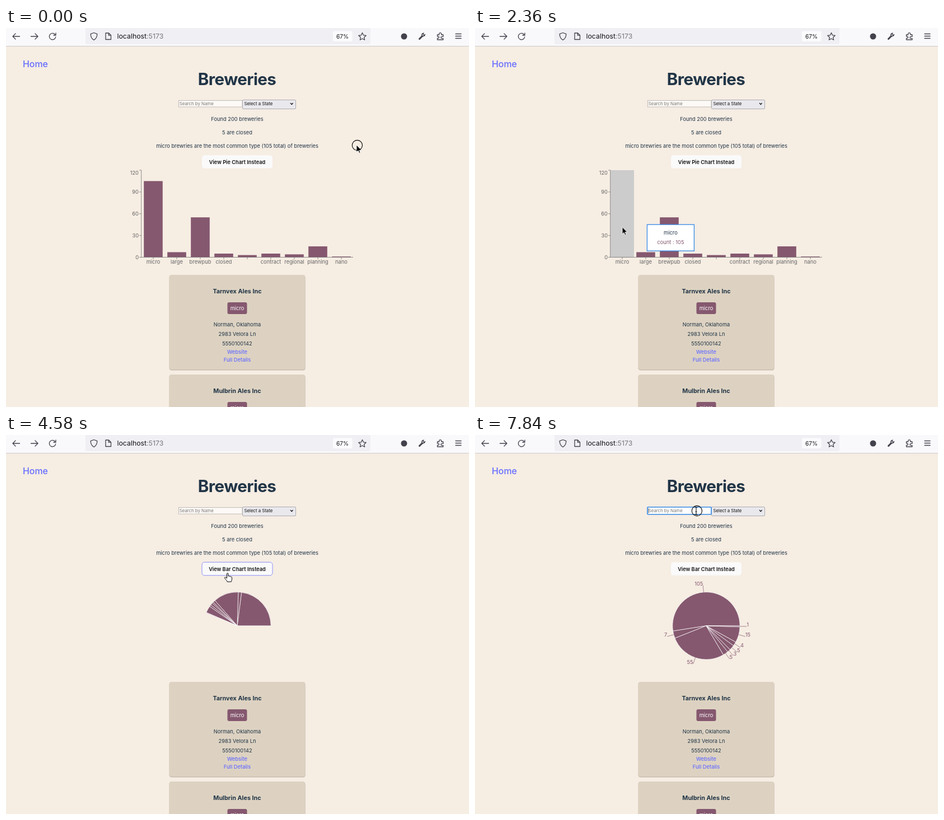
Write an HTML page that moves like this. It is 827x677 px and loops after 7990 ms.

```html
<!DOCTYPE html>
<html lang="en">
<head>
<meta charset="utf-8">
<title>Breweries</title>
<style>
  html, body { margin: 0; width: 100%; height: 100%; overflow: hidden; background: #f6ede3; }
  svg { display: block; width: 827px; height: 677px; font: 9.3px Inter, sans-serif; }
  text { fill: #213547; }
  .mid { text-anchor: middle; }
  .end { text-anchor: end; }
  .h1 { font-size: 29.6px; font-weight: 700; letter-spacing: -.6px; }
  .h3 { font-size: 10.8px; font-weight: 700; }
  .link { fill: #646cff; font-weight: 500; }
  .home { font-size: 15.9px; }
  .btn { font-size: 9.2px; font-weight: 600; fill: #111; }
  .form { font-size: 7.8px; fill: #111; }
  .hint { fill: #7b7977; }
  .white { fill: #fff; }
  .axis { fill: #666; }
  .plum { fill: #85586f; }
  .lines { fill: none; stroke: #777; stroke-width: .8; }
  .icons { fill: none; stroke: #43424c; stroke-width: 1.3; stroke-linecap: round; stroke-linejoin: round; }
</style>
</head>
<body>
<svg viewBox="0 0 827 677">
  <rect width="827" height="677" fill="#f6ede3"/>
  <rect width="827" height="32.5" fill="#f9f9fb"/>
  <path d="M0 32.5H827" stroke="#cfcbca"/>
  <path d="M142 0H651V25a4 4 0 0 1-4 4H146a4 4 0 0 1-4-4Z" fill="#f0f0f4"/>
  <rect x="584" y="5.5" width="34.5" height="18.5" rx="3" fill="#fbfbfd"/>
  <g class="icons">
    <path d="M24.5 15H12M17 10l-5 5 5 5M44.5 15H57M52 10l5 5-5 5"/>
    <path d="M87.5 11.5A5.7 5.7 0 1 0 88.7 16M89 9v4h-4"/>
    <path d="M157 8.5l5.8 2.2c0 5-1.5 8.3-5.8 10.8-4.3-2.5-5.8-5.8-5.8-10.8Z"/>
    <path d="M178 9h5.5l4 4v7.5H178ZM183.3 9v4.2h4"/>
    <path d="M636.5 8.5l2 4.3 4.7.6-3.5 3.2.9 4.7-4.1-2.3-4.1 2.3.9-4.7-3.5-3.2 4.7-.6Z"/>
    <path d="M738.5 19.5l5-5" stroke-width="3"/>
    <path d="M748.5 11.5l-2.2 1.4-1.7-1.6 1.5-2.2a3.6 3.6 0 0 0-3.3 5 3.6 3.6 0 0 0 5.7-2.6Z"/>
    <path d="M770.5 12h3.2c-1-4.5 5-4.5 4 0h3.2v3.3h-2.2c-2.5 0-2.5 3.4 0 3.4h2.2v2.3H770.500v-2.8c4 .7 4-3.8 0-3.2Z"/>
    <path d="M803 10.5h10M803 14.5h10M803 18.5h10"/>
  </g>
  <circle cx="711" cy="15" r="5.5" fill="#43424c"/>
  <text x="198.5" y="19.3" style="font-size:12.3px;fill:#15141a">localhost<tspan fill="#77767e">:5173</tspan></text>
  <text class="mid" x="601" y="18.8" style="font-size:10.2px;fill:#15141a">67%</text>
  <text class="link home" x="30" y="69.8">Home</text>
  <text class="h1 mid" x="412.6" y="101.5">Breweries</text>
  <g id="page"></g>
  <g id="live"></g>
</svg>
<script>
const LOOP = 7990, STEP = LOOP / 54;
const PLUM = '#85586f', BLUE = '#358ae6';
const types = ['micro', 'large', 'brewpub', 'closed', 'proprietor', 'contract', 'regional', 'planning', 'nano'];
const counts = [105, 7, 55, 5, 3, 5, 4, 15, 1];
const TOTAL = 200;
const X0 = 242, Y0 = 409.5, BAND = 42, UNIT = 155.5 / 120;
const CX = 413, CY = 340.8, R = 60.2;

// Pointer route: time, x, y
const route = [
  [0, 626, 209], [650, 626, 209], [890, 604, 236], [1040, 580, 262], [1190, 545, 280],
  [1340, 500, 291], [1480, 450, 297], [1780, 430, 297], [1924, 342, 330], [2072, 300, 345],
  [2220, 262, 355], [2500, 264, 356], [2650, 300, 325], [2812, 366, 258], [2960, 385, 256],
  [3108, 395, 246], [3250, 396, 247], [5240, 396, 247], [5328, 415, 275], [5474, 452, 322],
  [5900, 452, 322], [6100, 440, 330], [6400, 415, 318], [6658, 383, 282], [6800, 383, 282],
  [7500, 395, 135], [LOOP, 395, 135]
];
// Hovered band: time, index, pointer y
const hovers = [
  [1100, 8, 262], [1240, 7, 280], [1380, 6, 291], [1500, 4, 297], [1960, 2, 332],
  [2150, 1, 350], [2250, 0, 356.5], [2730, 2, 290], [3040, -1, 0]
];
const CLICKS = [[0, 140], [3690, 3830], [7835, LOOP]];
const SWITCH = 3835, PIE_START = 4192, PIE_TIME = 1500;
const TIP_IN = 5900, TIP_OUT = 6600;

const rect = (x, y, w, h, attrs) => `<rect x="${x}" y="${y}" width="${w}" height="${h}" ${attrs}/>`;
const text = (x, y, s, cls = 'mid') => `<text x="${x}" y="${y}" class="${cls}">${s}</text>`;
const mix = (a, b, k) => a + (b - a) * k;
const clamp = v => Math.max(0, Math.min(1, v));
const center = i => X0 + BAND * (i + .5);
const polar = (r, deg) => {
  const a = deg * Math.PI / 180;
  return [CX + r * Math.cos(a), CY - r * Math.sin(a)];
};

// CSS "ease": cubic-bezier(.25, .1, .25, 1)
function ease(x) {
  if (x <= 0 || x >= 1) return clamp(x);
  let lo = 0, hi = 1, s;
  for (let i = 0; i < 24; i++) {
    s = (lo + hi) / 2;
    if (.75 * s * (1 - s) + s ** 3 < x) lo = s; else hi = s;
  }
  return .3 * s * (1 - s) ** 2 + 3 * s * s * (1 - s) + s ** 3;
}

function pointer(t) {
  const i = Math.max(1, route.findIndex(p => p[0] > t));
  const [t0, x0, y0] = route[i - 1], [t1, x1, y1] = route[i];
  const k = clamp((t - t0) / (t1 - t0));
  return [mix(x0, x1, k), mix(y0, y1, k)];
}

const inside = ([x, y], l, t, r, b) => x > l && x < r && y > t && y < b;
const onButton = p => inside(p, 350, 227, 476, 251);
const onInput = p => inside(p, 308, 129, 422, 142);

function card(y, name, place = [], links = []) {
  return rect(292.5, y + 2, 242, 169, 'rx="4" fill="#8a7c6c" opacity=".22"')
    + rect(291.5, y + .5, 243, 169.5, 'rx="4" fill="#c9bdac"')
    + rect(292, y, 242, 169, 'rx="4" fill="#ddd2c1"')
    + text(413, y + 33, name, 'h3 mid')
    + rect(395.5, y + 49, 35, 21, `rx="3" fill="${PLUM}"`)
    + text(413, y + 62.8, 'micro', 'mid white')
    + place.map((s, i) => text(413, y + 91.7 + 17 * i, s)).join('')
    + links.map((s, i) => text(413, y + 140.6 + 14.5 * i, s, 'mid link')).join('');
}

const page = text(413, 165.5, `Found ${TOTAL} breweries`)
  + text(413, 189.5, '5 are closed')
  + text(413, 213.7, 'micro brewries are the most common type (105 total) of breweries')
  + rect(422.5, 128.5, 95, 16, 'rx="1.5" fill="#e9e9ed" stroke="#a5a3a9" stroke-width=".9"')
  + text(425.5, 138.3, 'Select a State', 'form')
  + '<path d="M508 134l2.3 2.5 2.3-2.5" fill="none" stroke="#111" stroke-width="1.2"/>'
  + card(441, 'Tarnvex Ales Inc', ['Norman, Oklahoma', '2983 Velora Ln', '5550100142'], ['Website', 'Full Details'])
  + card(619, 'Mulbrin Ales Inc');

function tooltip(x, y, w, rows) {
  return rect(x, y, w, 13 + 17 * rows.length, `fill="#fff" stroke="${BLUE}" stroke-width="1.3"`)
    + rows.map((s, i) => text(x + w / 2, y + 17.5 + 17 * i, s, i === rows.length - 1 ? 'mid plum' : 'mid')).join('');
}

const tipWidth = i => 66 + 6 * String(counts[i]).length;

// Where the tooltip heads for band i; it flips at the chart's right edge
function tipTarget(i, y) {
  const x = center(i) + 6, w = tipWidth(i);
  return [x + w > 623 ? center(i) - 6 - w : x - .5, y + 5.5];
}

function hoverState(t) {
  let state = null;
  for (const [start, i, y] of hovers) {
    if (start > t) break;
    if (i < 0) { state = null; continue; }
    const to = tipTarget(i, y);
    state = { i, start, to, from: state ? tipPos(state, start) : to };
  }
  return state;
}

function tipPos({ from, to, start }, t) {
  const k = ease((t - start) / 400);
  return [mix(from[0], to[0], k), mix(from[1], to[1], k)];
}

function barChart(t) {
  const hover = hoverState(t);
  let s = counts.map((n, i) =>
    rect(center(i) - 16.8, Y0 - n * UNIT, 33.6, n * UNIT, `fill="${PLUM}"`)).join('');
  if (hover) s += rect(X0 + BAND * hover.i, 254, BAND, 155.5, 'fill="#ccc"');
  let d = `M${X0 - .3} 254V${Y0}H620`;
  for (let v = 0; v <= 120; v += 30) {
    const y = Y0 - v * UNIT;
    d += `M238 ${y}h4`;
    s += text(237, v === 120 ? 261.5 : y + 3.3, v, 'axis end');
  }
  types.forEach((name, i) => {
    d += `M${center(i)} ${Y0}v3.6`;
    if (i !== 4) s += text(center(i), 421.3, name, 'axis mid');
  });
  s += `<path class="lines" d="${d}"/>`;
  if (hover) {
    s += tooltip(...tipPos(hover, t), tipWidth(hover.i), [types[hover.i], `count : ${counts[hover.i]}`]);
  }
  return s;
}

function pieChart(t) {
  const grow = ease((t - PIE_START) / PIE_TIME);
  if (!grow) return '';
  let s = '', labels = '', angle = 0;
  for (const n of counts) {
    const sweep = n / TOTAL * 360 * grow, mid = angle + sweep / 2;
    const a = polar(R, angle), b = polar(R, angle + sweep);
    s += `<path d="M${CX} ${CY}L${a}A${R} ${R} 0 ${+(sweep > 180)} 0 ${b}Z" fill="${PLUM}" stroke="#fff" stroke-width=".7"/>`;
    const p = polar(R, mid), q = polar(R + 12, mid);
    labels += `<path d="M${p}L${q}" stroke="${PLUM}" stroke-width=".7"/>`
      + text(...q, n, q[0] > CX ? 'plum' : 'plum end');
    angle += sweep;
  }
  if (grow === 1) s += labels;
  if (t > TIP_IN && t < TIP_OUT) {
    const k = ease((t - TIP_IN) / 400);
    s += tooltip(mix(252, 417, k), mix(228, 317, k), 64, ['micro : 105']);
  }
  return s;
}

function button(label, hover) {
  return rect(350, 227.2, 126, 23.6, `rx="4.5" fill="#fafafa" ${hover ? 'stroke="#7d83fb" stroke-width=".9"' : ''}`)
    + text(413, 242.6, label, 'mid btn');
}

function input(focus) {
  const box = focus
    ? rect(308, 128.8, 114, 13, `rx="1" fill="#fff" stroke="${BLUE}" stroke-width="1.6"`)
      + '<path d="M310 131v8.5" stroke="#222" stroke-width=".7"/>'
    : rect(308.5, 129.5, 113.5, 11.5, 'fill="#fcf9f6" stroke="#bab5b2" stroke-width=".9"');
  return box + text(309.8, 138.3, 'Search by Name', 'form hint');
}

const shapes = {
  arrow: '<path d="M0 0V12.6L3 9.9 5 14.4 7 13.5 5.1 9.2H9Z" fill="#000" stroke="#fff" stroke-width=".9"/>',
  hand: '<path d="M-1.5 .8C-1.5-.8 .9-.8 .9 .8V5.2C1.6 4.4 3 4.6 3.2 5.6 4 5 5.3 5.3 5.4 6.3 6.4 5.8 7.5 6.5 7.5 7.6V10.6C7.5 13 6.3 13.6 6.2 15.2H-.8C-.9 13.3-3.6 11.4-5.2 8.8-6 7.4-4.4 6.4-3.3 7.4L-1.5 9Z" fill="#fff" stroke="#000"/>',
  beam: '<path d="M-2.5-6Q0-6 0-4.5Q0-6 2.5-6M0-4.5V6M-2.5 7.5Q0 7.5 0 6Q0 7.5 2.5 7.5M-1.5 2h3" fill="none" stroke="#111" stroke-width="1.1"/>'
};

function cursor(t) {
  const p = pointer(t);
  const shape = onButton(p) ? 'hand' : onInput(p) ? 'beam' : 'arrow';
  const ring = CLICKS.some(([a, b]) => t >= a && t < b)
    ? '<circle cx="1.4" cy=".5" r="9.1" fill="none" stroke="#000" stroke-width="1.1"/>' : '';
  return `<g transform="translate(${p})">${shapes[shape]}${ring}</g>`;
}

function render(t) {
  const pie = t >= SWITCH;
  // Page hover trails the pointer by one step
  const hover = onButton(pointer(Math.max(0, t - STEP)));
  return (pie ? pieChart(t) : barChart(t))
    + button(`View ${pie ? 'Bar' : 'Pie'} Chart Instead`, hover)
    + input(t >= CLICKS[2][0])
    + cursor(t);
}

const live = document.getElementById('live');
document.getElementById('page').innerHTML = page;
let shown = -1;
function frame() {
  const tick = Math.floor((performance.now() % LOOP + 25) / STEP) % 54;
  if (tick !== shown) live.innerHTML = render((shown = tick) * STEP);
  requestAnimationFrame(frame);
}
frame();
</script>
</body>
</html>
```
